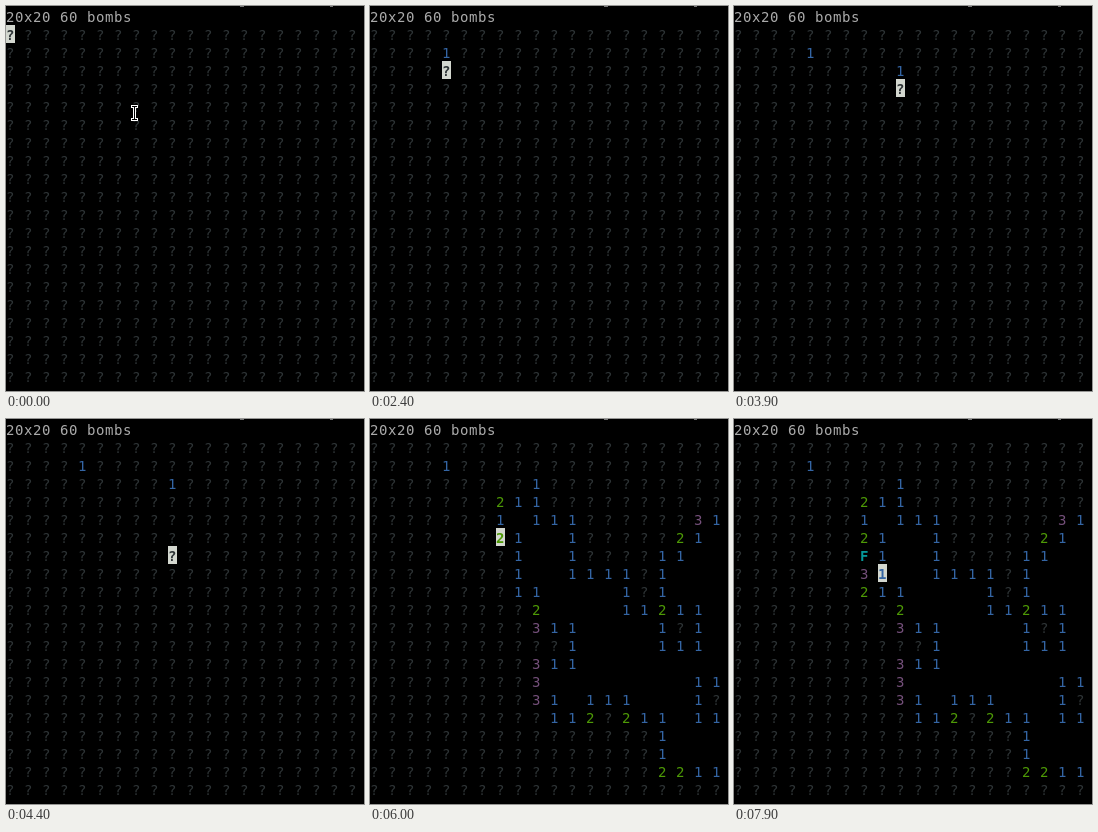
These frames come from a looping animation (358 px wide and 385 px high, 8000 ms). An HTML page:

```html
<!DOCTYPE html>
<html lang="en">
<head>
<meta charset="utf-8">
<title>Terminal minesweeper</title>
<style>
  html, body { margin: 0; width: 100%; height: 100%; overflow: hidden; background: #000; }
  svg { display: block; }
  /* Glyphs sit on a 9px terminal grid */
  text { font: 14px "DejaVu Sans Mono", monospace; letter-spacing: calc(9px - 0.602em); }
  .bold { font-weight: bold; }
</style>
</head>
<body>
<svg id="stage" width="358" height="385" viewBox="0 0 358 385">
  <rect width="358" height="385" fill="#000"/>
  <path d="M234 .5h4M324 .5h3" stroke="#777"/>
  <text x="0" y="16" fill="#aaa">20x20 60 bombs</text>
  <rect id="cursor" width="9" height="18" fill="#d3d7cf"/>
  <g id="board"></g>
  <g id="pointer" fill="none">
    <path d="M125 100.5h7M125 113.5h7M128.5 100v14" stroke="#fff" stroke-width="3"/>
    <path d="M126 100.5h5M126 113.5h5M128.5 100v14" stroke="#000"/>
  </g>
</svg>
<script>
const LOOP = 8000, SIZE = 20, STEP = 18, TOP = 19, BASELINE = 15;
const POINTER_END = 700;
const COLORS = { '?': '#2e3436', 1: '#3465a4', 2: '#4e9a06', 3: '#75507b', F: '#06989a' };

// Cursor stops: time, column, row
const MOVES = [
  [0, 0, 0], [1000, 1, 1], [1200, 2, 1], [1300, 3, 1], [1500, 4, 1],
  [2400, 4, 2], [2600, 5, 2], [2900, 6, 2], [3200, 8, 2], [3300, 9, 2],
  [3900, 9, 3], [4100, 9, 4], [4200, 9, 5], [4400, 9, 6],
  [6000, 7, 5], [6300, 7, 6], [7100, 7, 7], [7500, 8, 7]
];

// Area uncovered by one click, from column 7, row 3
const AREA = [
  '211??????????',
  '1 111??????31',
  '21  1?????21 ',
  '?1  1????11  ',
  '?1  1111?1   ',
  '?11    1?1   ',
  '??2    11211 ',
  '??311    1?1 ',
  '????1    111 ',
  '??311        ',
  '??3        11',
  '??31 111   1?',
  '???112?211 11',
  '?????????1   ',
  '?????????1   ',
  '?????????2211'
];

// Uncovered blocks: time, column, row, lines
const REVEALS = [
  [1800, 4, 1, ['1']],
  [3300, 9, 2, ['1']],
  [4600, 7, 3, AREA],
  [6600, 7, 6, ['F']],
  [7900, 7, 7, ['3', '2']]
];

const board = document.getElementById('board');
const cursor = document.getElementById('cursor');
const pointer = document.getElementById('pointer');

const cells = Array.from({ length: SIZE * SIZE }, (_, i) => {
  const cell = document.createElementNS('http://www.w3.org/2000/svg', 'text');
  cell.setAttribute('x', i % SIZE * STEP);
  cell.setAttribute('y', TOP + BASELINE + Math.floor(i / SIZE) * STEP);
  return board.appendChild(cell);
});

function boardAt(time) {
  const marks = Array(SIZE * SIZE).fill('?');
  for (const [start, col, row, lines] of REVEALS) {
    if (time < start) break;
    lines.forEach((line, y) => [...line].forEach((mark, x) => {
      marks[(row + y) * SIZE + col + x] = mark;
    }));
  }
  return marks;
}

function render(time) {
  const [, col, row] = MOVES.filter(([start]) => start <= time).pop();
  const marks = boardAt(time);
  cursor.setAttribute('x', col * STEP);
  cursor.setAttribute('y', TOP + row * STEP);
  pointer.setAttribute('visibility', time < POINTER_END ? 'visible' : 'hidden');
  cells.forEach((cell, i) => {
    const mark = marks[i];
    if (cell.textContent !== mark) {
      cell.textContent = mark;
      cell.setAttribute('fill', COLORS[mark] || 'none');
    }
    cell.classList.toggle('bold', mark === 'F' || i === row * SIZE + col);
  });
}

const began = performance.now();
function tick() {
  render((performance.now() - began) % LOOP);
  requestAnimationFrame(tick);
}
tick();
</script>
</body>
</html>
```
